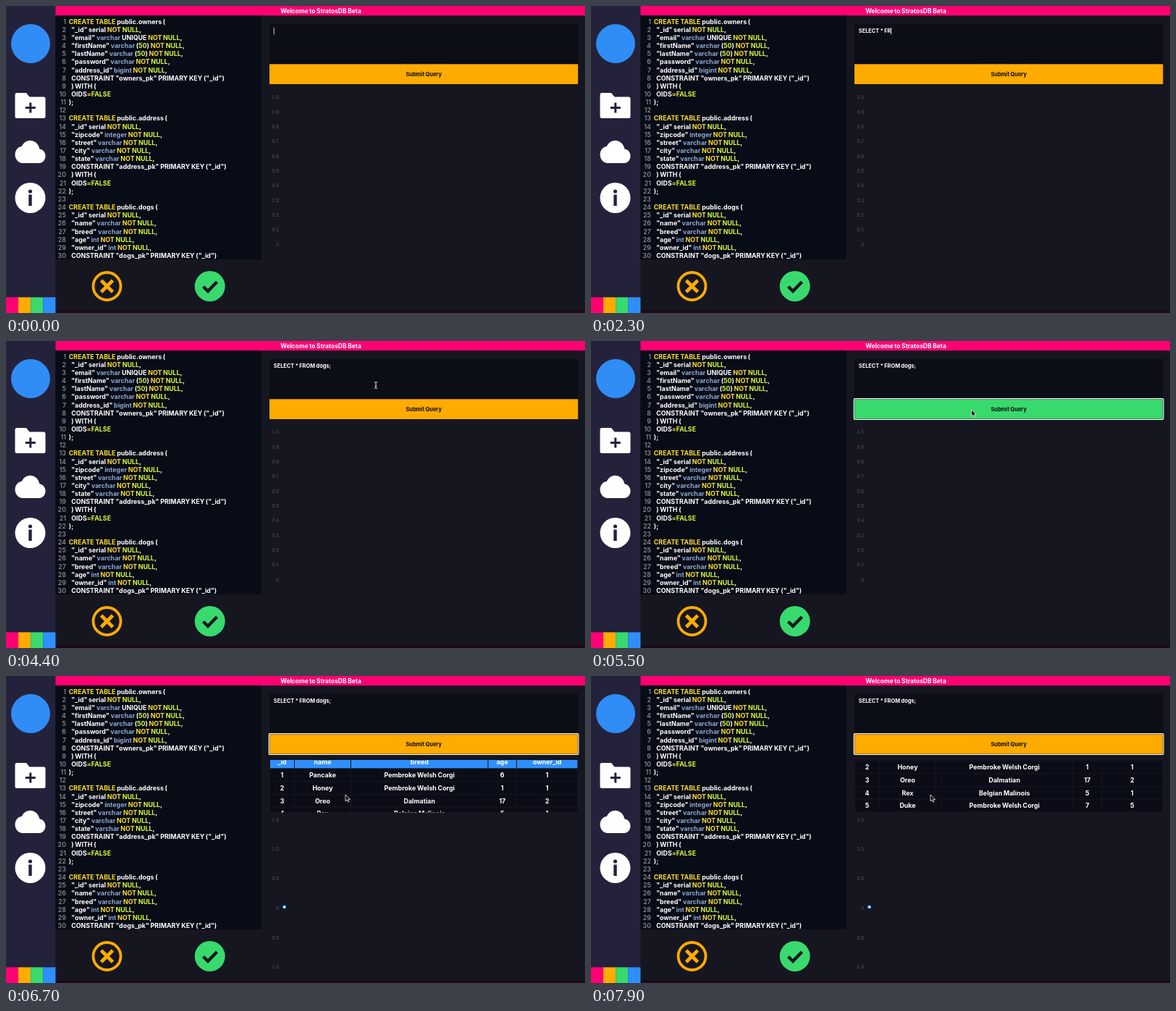
An HTML page for the animation above (8 s loop, 800 by 424 pixels).

```html
<!DOCTYPE html>
<html lang="en">
<head>
<meta charset="utf-8">
<title>SQL query console</title>
<style>
  html, body { margin: 0; width: 100%; height: 100%; overflow: hidden; background: #161621; }
  svg { display: block; width: 800px; height: 424px; }
  text {
    font-family: Inter, "Liberation Sans", sans-serif; font-weight: 700; font-size: 8.89px;
    font-feature-settings: "calt" 0; word-spacing: -0.045em; fill: #fff; white-space: pre;
  }
  .mid { text-anchor: middle; }
  .num { text-anchor: end; fill: #888; font-weight: 600; }
  .key { fill: #fbde2d; }
  .atom { fill: #d8fa3c; }
  .type { fill: #8da6ce; }
  .tick { font: 400 6.67px "Liberation Sans", Arial, sans-serif; text-anchor: end; fill: #53535b; }
  .title { font-size: 8.45px; }
  .small { font-size: 7.41px; }
</style>
</head>
<body>
<svg id="stage" viewBox="0 0 800 424">
  <defs>
    <clipPath id="codeClip"><rect x="68" y="13" width="285" height="337"/></clipPath>
    <clipPath id="tableClip"><rect x="364" y="116" width="427" height="72.4"/></clipPath>
  </defs>
  <rect width="800" height="424" fill="#161621"/>
  <rect x="68" y="420" width="732" height="4" fill="#1c0a1b"/>

  <rect width="68.4" height="424" fill="#24223b"/>
  <circle cx="34" cy="52" r="27" fill="#2f8df5"/>
  <g fill="#fff">
    <path d="M14.5 120H28l4.500 5.500H52a2.500 2.500 0 0 1 2.500 2.500V152.500a2.500 2.500 0 0 1-2.500 2.500H15a2.500 2.500 0 0 1-2.500-2.500V122.500a2.500 2.500 0 0 1 2-2.500z"/>
    <path transform="translate(12.5 178) scale(1.75 1.95)" d="M19.350 10.040C18.670 6.590 15.640 4 12 4 9.110 4 6.600 5.640 5.350 8.040 2.340 8.360 0 10.910 0 14c0 3.310 2.690 6 6 6h13c2.760 0 5-2.240 5-5 0-2.640-2.050-4.780-4.650-4.960z"/>
    <circle cx="33.5" cy="265" r="21"/>
  </g>
  <g fill="#24223b">
    <path d="M32.3 133.500h3v5.500h5.500v3h-5.500v5.500h-3v-5.500h-5.500v-3h5.500z"/>
    <circle cx="33.5" cy="256" r="2.6"/>
    <rect x="31.3" y="260.5" width="4.4" height="15.5"/>
  </g>
  <g id="strips"></g>

  <rect x="68.4" width="731.6" height="13.2" fill="#ff0073"/>
  <text class="mid title" x="435" y="9.6">Welcome to StratosDB Beta</text>

  <rect x="68.4" y="13.2" width="284.6" height="336.8" fill="#080c17"/>
  <g id="code" clip-path="url(#codeClip)"></g>

  <circle cx="139.5" cy="387" r="19" fill="none" stroke="#ffab00" stroke-width="3.8"/>
  <path d="M131.5 379l16 16m0-16l-16 16" stroke="#ffab00" stroke-width="4.8"/>
  <circle cx="281.7" cy="387" r="21" fill="#39da6d"/>
  <path d="M272.5 387.500l6.500 6.300L291.500 381" fill="none" stroke="#161621" stroke-width="4.4"/>

  <rect x="364" y="24.5" width="426.5" height="55.5" fill="#0b0d17"/>
  <text id="query" class="small" x="369.8" y="37.2"></text>
  <rect id="caret" y="29.8" width="0.8" height="9.5" fill="#fff"/>

  <rect id="button" x="364" y="80.3" width="426.3" height="27.6"/>
  <g id="ring" fill="none">
    <rect x="363.3" y="79.7" width="427.7" height="28.8" rx="1.5" stroke="#fff" stroke-width="1.2"/>
    <rect x="364.3" y="80.7" width="425.7" height="26.8" rx="1" stroke="#101010" stroke-opacity="0.5" stroke-width="0.6"/>
  </g>
  <text class="mid small" x="577.2" y="96.9" style="fill:#0b0b12">Submit Query</text>

  <g id="idleChart"></g>
  <g id="results">
    <g id="resultChart"></g>
    <circle cx="384.6" cy="319" r="1.9" fill="#fff" stroke="#3b95f5" stroke-width="1.2"/>
    <g clip-path="url(#tableClip)"><g id="table"></g></g>
  </g>

  <path id="arrow" d="M0 0V8.800L2.100 6.900 3.500 10 5 9.300 3.700 6.400H6.500z" fill="#000" stroke="#fff" stroke-width="0.8"/>
  <path id="beam" d="M-2.200-4.500Q0-4.500 0-3Q0-4.500 2.200-4.500M0-3V3M-2.200 4.500Q0 4.500 0 3Q0 4.500 2.200 4.500M-1.300 1H1.300" fill="none" stroke="#ddd"/>
</svg>
<script>
const LOOP = 8000, STEP = 100;
const $ = id => document.getElementById(id);

function add(parent, tag, attrs, content) {
  const el = document.createElementNS("http://www.w3.org/2000/svg", tag);
  for (const k in attrs) el.setAttribute(k, attrs[k]);
  if (content !== undefined) el.textContent = content;
  return parent.appendChild(el);
}

["#ff0073", "#ffab00", "#39da6d", "#2f8fff"].forEach((fill, i) =>
  add($("strips"), "rect", { x: i * 17.1, y: 402.3, width: 17.1, height: 21.7, fill }));

// Schema listing
function createTable(name, columns) {
  return [
    `CREATE TABLE public.${name} (`,
    ...["_id serial", ...columns].map(c => `  ${c.replace(/^\w+/, '"$&"')} NOT NULL,`),
    `  CONSTRAINT "${name}_pk" PRIMARY KEY ("_id")`,
    "  ) WITH (", "  OIDS=FALSE", ");", ""
  ];
}
const lines = [
  ...createTable("owners", ["email varchar UNIQUE", "firstName varchar (50)", "lastName varchar (50)", "password varchar", "address_id bigint"]),
  ...createTable("address", ["zipcode integer", "street varchar", "city varchar", "state varchar"]),
  ...createTable("dogs", ["name varchar", "breed varchar", "age int", "owner_id int"])
].slice(0, 30);

function tokenClass(word) {
  if (/^(CREATE|TABLE|NOT|=)$/.test(word)) return "key";
  if (/^(NULL|FALSE|50)$/.test(word)) return "atom";
  return /^(varchar|integer|bigint|int)$/.test(word) ? "type" : "";
}
lines.forEach((line, i) => {
  const y = 24.6 + i * 11.15;
  add($("code"), "text", { class: "num", x: 83, y }, i + 1);
  const row = add($("code"), "text", { x: 86.8, y });
  for (const part of line.split(/(\w+|=)/)) {
    if (part) add(row, "tspan", { class: tokenClass(part) }, part);
  }
});

// Chart axes
function axis(parent, top, gap, labels) {
  labels.forEach((s, i) => add(parent, "text", { class: "tick", x: 377, y: top + i * gap + 2.4 }, s));
}
axis($("idleChart"), 126, 20.32, Array.from({ length: 11 }, (_, i) => i < 10 ? (1 - i / 10).toFixed(1) : "0"));
axis($("resultChart"), 198.3, 40.7, ["1.5", "1.0", "0.5", "0", "-0.5", "-1.0"]);

// Result table
const ROW = 17.8, edges = [364.5, 398.5, 476.5, 666, 705.5, 790];
[
  ["_id", "name", "breed", "age", "owner_id"],
  [1, "Pancake", "Pembroke Welsh Corgi", 6, 1],
  [2, "Honey", "Pembroke Welsh Corgi", 1, 1],
  [3, "Oreo", "Dalmatian", 17, 2],
  [4, "Rex", "Belgian Malinois", 5, 1],
  [5, "Duke", "Pembroke Welsh Corgi", 7, 5]
].forEach((row, r) => row.forEach((value, c) => {
  const x = edges[c], w = edges[c + 1] - x, y = 116 + r * ROW;
  add($("table"), "rect", { x: x + 0.5, y: y + 0.5, width: w - 1, height: ROW - 1, fill: r ? "#0a0d17" : "#2f8fff" });
  add($("table"), "text", { class: "mid", x: x + w / 2, y: y + 12.1 }, value);
}));

// Timeline
const QUERY = "SELECT * FROM dogs;";
const keyTimes = [300, 500, 600, 700, 900, 1000, 1200, 1300, 1800, 2000, 2200, 2400, 2600, 2800, 3000, 3200, 3400, 3600, 3800];
const pointer = [[4200, 507, 48], [4400, 511, 61], [4500, 515, 82], [4800, 525, 96], [5500, 525.7, 95], [5900, 525.7, 95], [6300, 469, 164]];
const scroll = [[6500, 0], [6700, 6], [7000, 15], [7200, 23], [7400, 31], [7600, 34.7]];

function at(track, t, k) {
  const next = track.findIndex(p => p[0] > t);
  if (next < 0) return track[track.length - 1][k];
  if (next === 0) return track[0][k];
  const a = track[next - 1], b = track[next];
  return a[k] + (b[k] - a[k]) * (t - a[0]) / (b[0] - a[0]);
}
const show = (id, on) => $(id).style.display = on ? "" : "none";

function draw(t) {
  const typed = keyTimes.filter(k => k <= t).length;
  const query = $("query");
  query.textContent = QUERY.slice(0, typed);
  $("caret").setAttribute("x", 369.8 + (typed ? query.getComputedTextLength() : 0));
  show("caret", t < 4300);

  const x = at(pointer, t, 1), y = at(pointer, t, 2);
  const visible = t >= 4200, overField = y < 80;
  show("beam", visible && overField);
  show("arrow", visible && !overField);
  for (const id of ["beam", "arrow"]) $(id).setAttribute("transform", `translate(${x} ${y})`);
  $("button").setAttribute("fill", visible && y >= 80 && y < 108 ? "#39da6d" : "#ffab00");

  show("ring", t >= 5300);
  show("idleChart", t < 5800);
  show("results", t >= 5800);
  $("table").setAttribute("transform", `translate(0 ${-at(scroll, t, 1)})`);
}

const start = performance.now();
function tick() {
  const t = Math.max(0, performance.now() - start) % LOOP;
  draw(Math.floor(t / STEP) * STEP);
  requestAnimationFrame(tick);
}
tick();
</script>
</body>
</html>
```
